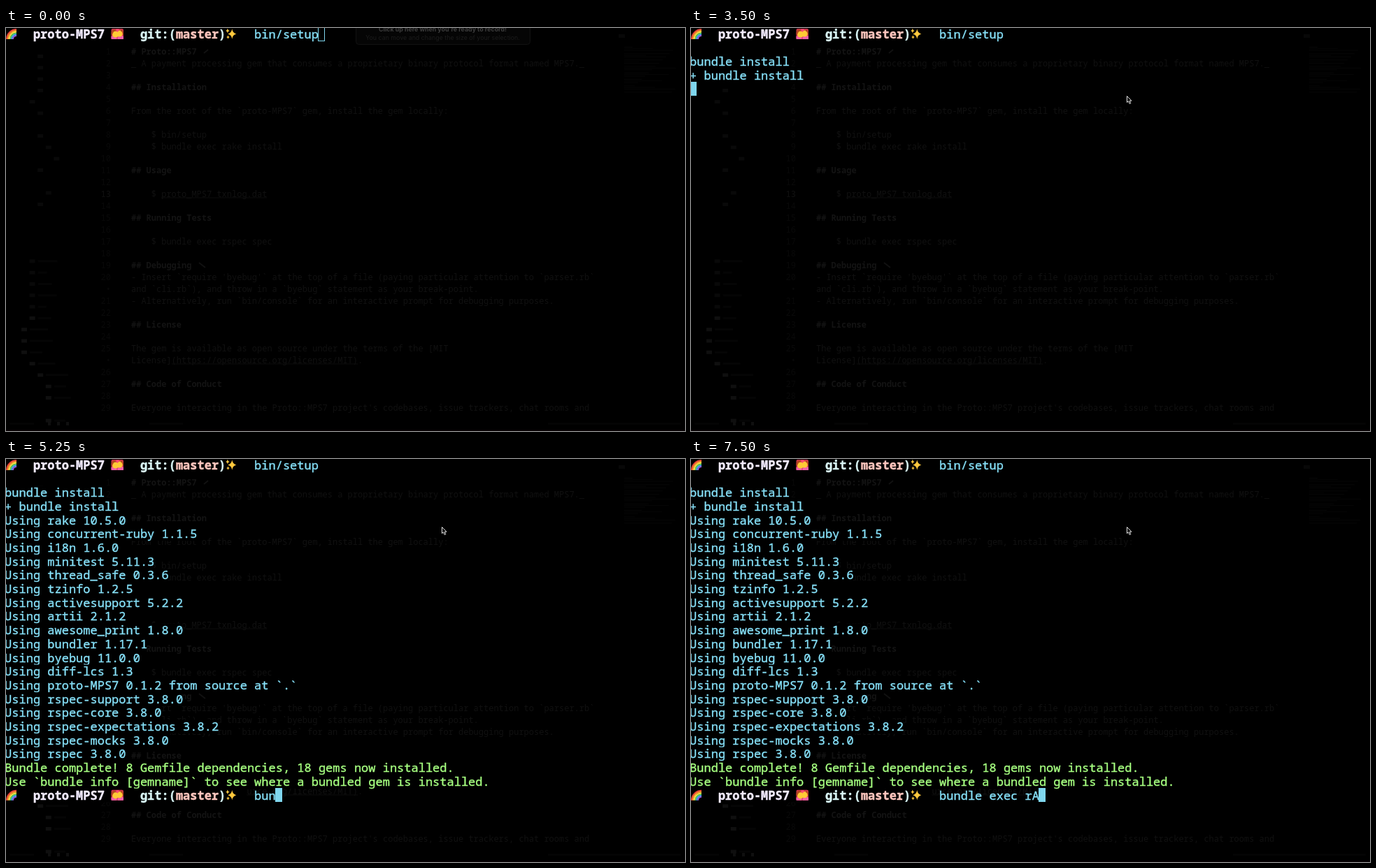
These frames come from a looping animation (971 px wide and 577 px high, 8 s). An HTML page:

```html
<!DOCTYPE html>
<html lang="en">
<head>
<meta charset="utf-8">
<title>Terminal session</title>
<style>
html, body { margin: 0; width: 100%; height: 100%; overflow: hidden; background: #000; }
svg { display: block; }
text { white-space: pre; }
.term { font: 500 17px "Noto Sans Mono", monospace; }
.term text { stroke-width: .4px; }
.strong { font-weight: 600; }
.editor { font: 12px "Noto Sans Mono", monospace; fill: #1b1b1b; opacity: .62; }
.heading { font-weight: 700; fill: #1f1f1f; }
.tip { font: 8.85px Inter, sans-serif; text-anchor: middle; }
.tip.strong { font-weight: 700; }
</style>
</head>
<body>
<svg id="stage" width="971" height="577" viewBox="0 0 971 577">
  <defs>
    <path id="star" d="M0 -1Q.16 -.16 1 0Q.16 .16 0 1Q-.16 .16 -1 0Q-.16 -.16 0 -1Z"/>
    <g id="rainbow" fill="none" stroke-width="2"></g>
    <g id="couple">
      <rect width="17.5" height="15" y="1" rx="2" fill="#d5304f"/>
      <path d="M0 16V12Q4 10 8 13V16ZM9 16V13Q13 9 17.5 12V16Z" fill="#f060a8"/>
      <circle cx="6" cy="9" r="4.6" fill="#ffca35"/>
      <circle cx="11.8" cy="8" r="4.6" fill="#ffca35"/>
      <path d="M0 9Q0 1 5 2Q7 3 6 4.5Q3 4 1.5 10ZM17.5 9Q17.5 2 14 2Q13 3 14 5Q16 5 16.5 10Z" fill="#b5481f"/>
      <path d="M9 6Q6 3 7.5 1.5Q8.6 .9 9 2Q9.6 .9 10.7 1.5Q12 3 9 6Z" fill="#ff4d72"/>
    </g>
    <g id="sparkles" fill="#ffc83d">
      <use href="#star" transform="translate(9.8 8.5) scale(6 7.2)"/>
      <use href="#star" transform="translate(3.4 4) scale(2.7 3.2)"/>
      <use href="#star" transform="translate(4 13) scale(2.3 2.8)"/>
    </g>
  </defs>
</svg>
<script>
const CELL = 10.2, LINE = 19.7, LEFT = -2.7, BASE = 14.7, TOP = -1.35, BEARING = 0.8;
const CYAN = '#86e0f8', GREEN = '#a6ff80', LOOP = 8000;
const stage = document.getElementById('stage');

function add(parent, tag, attrs, content) {
  const node = document.createElementNS('http://www.w3.org/2000/svg', tag);
  for (const key in attrs) node.setAttribute(key, attrs[key]);
  if (content !== undefined) node.textContent = content;
  parent.append(node);
  return node;
}
const box = (parent, x, y, width, height, fill) =>
  add(parent, 'rect', { x, y, width, height, fill });
const colX = col => LEFT + col * CELL;
const rowY = row => BASE + row * LINE;
const show = (node, on) => node.setAttribute('visibility', on ? 'visible' : 'hidden');
const write = (parent, col, row, text, fill) =>
  add(parent, 'text', { x: colX(col) + BEARING, y: rowY(row), fill, stroke: fill }, text);

['#f0433a', '#ff9a2e', '#ffe14a', '#57cf5c', '#3fa2f2', '#9a5be0'].forEach((stroke, i) => {
  const r = 14 - i * 1.8;
  add(document.getElementById('rainbow'), 'path',
    { d: `M${15 - r} 16A${r} ${r} 0 0 1 15 ${16 - r}`, stroke });
});

// Dimmed editor behind the terminal
const README = `# Proto::MPS7
_ A payment processing gem that consumes a proprietary binary protocol format named MPS7._

## Installation

From the root of the \`proto-MPS7\` gem, install the gem locally:

    $ bin/setup
    $ bundle exec rake install

## Usage

    $ proto_MPS7 txnlog.dat

## Running Tests

    $ bundle exec rspec spec

## Debugging
- Insert \`require 'byebug'\` at the top of a file (paying particular attention to \`parser.rb\`
~and \`cli.rb\`), and throw in a \`byebug\` statement as your break-point.
- Alternatively, run \`bin/console\` for an interactive prompt for debugging purposes.

## License

The gem is available as open source under the terms of the [MIT
~License](https://opensource.org/licenses/MIT).

## Code of Conduct

Everyone interacting in the Proto::MPS7 project's codebases, issue trackers, chat rooms and`;

function drawEditor() {
  const editor = add(stage, 'g', { class: 'editor' });
  let number = 0;
  README.split('\n').forEach((line, i) => {
    const y = 37.5 + i * 17, wrapped = line[0] === '~';
    if (!wrapped) number++;
    add(editor, 'text', { x: 150, y, 'text-anchor': 'end', fill: number === 13 ? '#1c1c1c' : '#0f0f0f' },
      wrapped ? '•' : number);
    const text = wrapped ? line.slice(1) : line;
    add(editor, 'text', { x: 179, y, class: text[0] === '#' ? 'heading' : '' }, text);
  });
  add(editor, 'path', { d: 'M237 481H503M222 243H373', stroke: '#161616' });
  add(editor, 'path', { d: 'M283 36l6 -5M276 336l9 7', stroke: '#1c1c1c', 'stroke-width': 2 });

  // File tree: one indent level per row, '.' leaves a gap
  [...'222212.2342.32....1111110001233 3'].forEach((level, i) => {
    if (level < '0') return;
    const x = 22 + level * 11.6, y = 38 + i * 16.3;
    box(editor, x, y, 8, 5, i > 22 ? '#191919' : '#0f0f0f');
    if (i > 17) box(editor, x + 12, y + 1, 12 + i * 7 % 22, 3, '#090909');
  });
  for (let i = 0; i < 29; i++)
    if (i % 4 !== 3) box(editor, 884, 27 + i * 2.3, 12 + i * 29 % 63, 1, '#0c0c0c');
  box(editor, 876, 9, 9, 5, '#0e0e0e');
  [60, 73, 86].forEach(x => box(editor, x, 564, 4, 5, '#191919'));
  [[5, 35], [205, 48], [775, 190]].forEach(([x, w]) => box(editor, x, 565, w, 3, '#080808'));
  box(editor, 0, 575, 971, 2, '#0c0408');
}

function drawTip() {
  const tip = add(stage, 'g', {});
  add(tip, 'rect', { x: 500.5, y: -6, width: 249, height: 29.5, rx: 4, fill: '#050505', stroke: '#121212' });
  add(tip, 'text', { x: 624.5, y: 5, class: 'tip strong', fill: '#3c3c3c' },
    "Click up here when you're ready to record!");
  add(tip, 'text', { x: 624.5, y: 17, class: 'tip', fill: '#1c1c1c' },
    'You can move and change the size of your selection.');
  return tip;
}

function drawLine(row, text, fill) {
  const line = add(stage, 'g', { class: 'term' });
  box(line, 0, rowY(row) - 15.7, colX(text.length), LINE, '#000');
  write(line, 0, row, text, fill);
  return line;
}

function drawPrompt(row) {
  const prompt = add(stage, 'g', { class: 'term' });
  const y = rowY(row);
  box(prompt, 0, y - 15.7, colX(34), LINE, '#000');
  [['rainbow', 0], ['couple', 150.5], ['sparkles', 313.5]].forEach(([id, x]) =>
    add(prompt, 'use', { href: '#' + id, x, y: y - BASE }));
  const label = add(prompt, 'g', { class: 'strong' });
  write(label, 4, row, 'proto-MPS7', '#f3ecff');
  write(label, 19, row, 'git:(', '#d9f6f6');
  write(label, 24, row, 'master', '#ffc5bd');
  write(label, 30, row, ')', '#d9f6f6');
  return { prompt, command: write(prompt, 35, row, '', CYAN) };
}

const GEMS = `rake 10.5.0|concurrent-ruby 1.1.5|i18n 1.6.0|minitest 5.11.3|thread_safe 0.3.6|tzinfo 1.2.5
|activesupport 5.2.2|artii 2.1.2|awesome_print 1.8.0|bundler 1.17.1|byebug 11.0.0|diff-lcs 1.3
|proto-MPS7 0.1.2 from source at \`.\`|rspec-support 3.8.0|rspec-core 3.8.0|rspec-expectations 3.8.2
|rspec-mocks 3.8.0|rspec 3.8.0`.replace(/\n/g, '').split('|');

drawEditor();
const tip = drawTip();
drawPrompt(0).command.textContent = 'bin/setup';
const output = ['bundle install', '+ bundle install', ...GEMS.map(gem => 'Using ' + gem)]
  .map((text, i) => drawLine(i + 2, text, CYAN));
output.push(
  drawLine(22, 'Bundle complete! 8 Gemfile dependencies, 18 gems now installed.', GREEN),
  drawLine(23, 'Use `bundle info [gemname]` to see where a bundled gem is installed.', GREEN));
const { prompt, command } = drawPrompt(24);
const caret = add(stage, 'rect', { stroke: '#7fd6ee' });
const mouse = add(stage, 'path', {
  d: 'M.5 .5V9.5L2.6 7.7L4.2 11.4L5.8 10.7L4.2 7.2H7Z',
  fill: '#000', stroke: '#e4e4e4', 'stroke-width': 1
});

// [start, output lines, caret column, caret row, caret style]
const SCREEN = [
  [0, 0, 44, 0, 'hollow'], [750, 0, 44, 0, 'off'], [1250, 0, 44, 0, 'solid'],
  [1500, 2, 0, 4, 'solid'], [3000, 2, 0, 4, 'off'], [3500, 2, 0, 4, 'solid'],
  [3750, 15, 0, 17, 'solid'], [4000, 22, 35, 24, 'solid']
];
const TYPED = [[0, 0], [4750, 1], [5000, 2], [5250, 3], [5500, 5], [5750, 7],
  [6000, 8], [6250, 9], [6500, 10], [6750, 12], [7000, 13], [7250, 14]];
const MOUSE = [[0, -40], [250, 60], [500, 96], [750, 97]];
const at = (steps, t) => steps.findLast(step => step[0] <= t);

function render(t) {
  const [, lines, column, row, style] = at(SCREEN, t);
  const typed = at(TYPED, t)[1];
  show(tip, t < 250);
  output.forEach((line, i) => show(line, i < lines));
  show(prompt, row === 24);
  command.textContent = 'bundle exec rA'.slice(0, typed);

  const inset = style === 'hollow' ? 0.5 : 0;
  const x = Math.max(-2, Math.round(colX(column + typed)));
  const y = Math.round(TOP + row * LINE);
  caret.setAttribute('x', x + inset);
  caret.setAttribute('y', y + inset);
  caret.setAttribute('width', 10 - 2 * inset);
  caret.setAttribute('height', 20 - 2 * inset);
  caret.setAttribute('fill', inset ? 'none' : '#7fd6ee');
  caret.setAttribute('stroke-width', inset ? 1 : 0);
  show(caret, style !== 'off');
  mouse.setAttribute('transform', `translate(623 ${at(MOUSE, t)[1]})`);
}

const start = performance.now();
function tick() {
  render((performance.now() - start) % LOOP);
  requestAnimationFrame(tick);
}
render(0);
requestAnimationFrame(tick);
</script>
</body>
</html>
```
